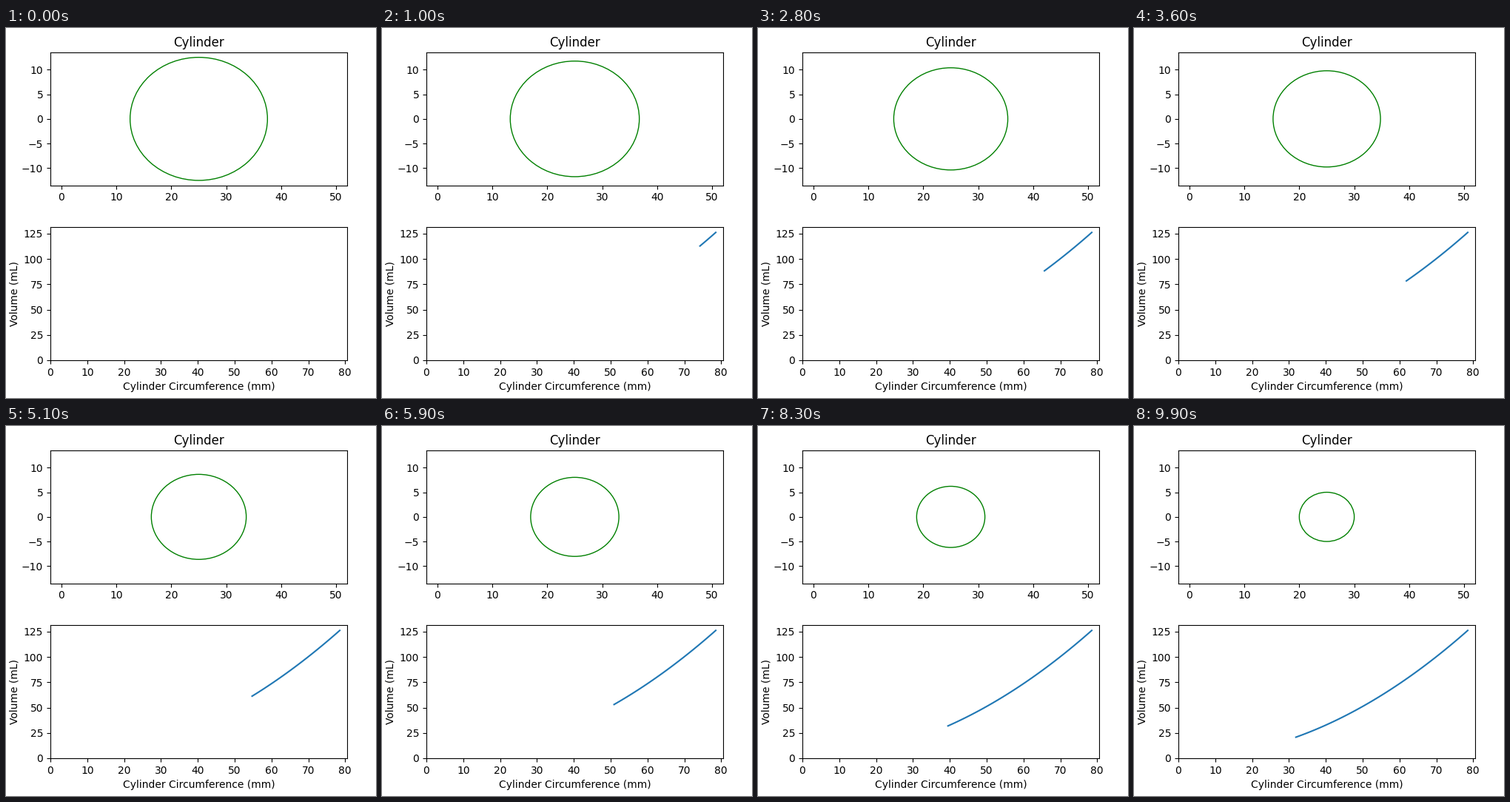
Write a matplotlib script that moves like this. It is 500 px wide and 500 px high and loops after 10 s.

```python
import numpy as np
import matplotlib.pyplot as plt
from matplotlib.animation import FuncAnimation
from matplotlib.patches import Circle

FRAMES = 100
R_MAX, R_MIN = 12.5, 5.0
HEIGHT = 257  # mm

radius = np.linspace(R_MAX, R_MIN, FRAMES)
circumference = 2 * np.pi * radius
volume = np.pi * radius**2 * HEIGHT / 1000  # mm^3 to mL

fig, (top, bottom) = plt.subplots(2, 1, figsize=(5, 5), dpi=100)
fig.subplots_adjust(left=0.12, right=0.922, top=0.934, bottom=0.102,
                    hspace=56.8 / 179.6)

top.set_title("Cylinder")
top.set_xlim(-2, 52)
top.set_ylim(-R_MAX - 1, R_MAX + 1)
circle = top.add_patch(Circle((25, 0), R_MAX, color="green", fill=False))

bottom.set_xlim(0, circumference[0] + 2)
bottom.set_ylim(0, volume[0] + 5)
bottom.set_xlabel("Cylinder Circumference (mm)")
bottom.set_ylabel("Volume (mL)")
curve, = bottom.plot([], [])


def update(i):
    circle.set_radius(radius[i])
    curve.set_data(circumference[:i], volume[:i])
    return circle, curve


anim = FuncAnimation(fig, update, frames=FRAMES, interval=100, repeat=True)
plt.show()
```
